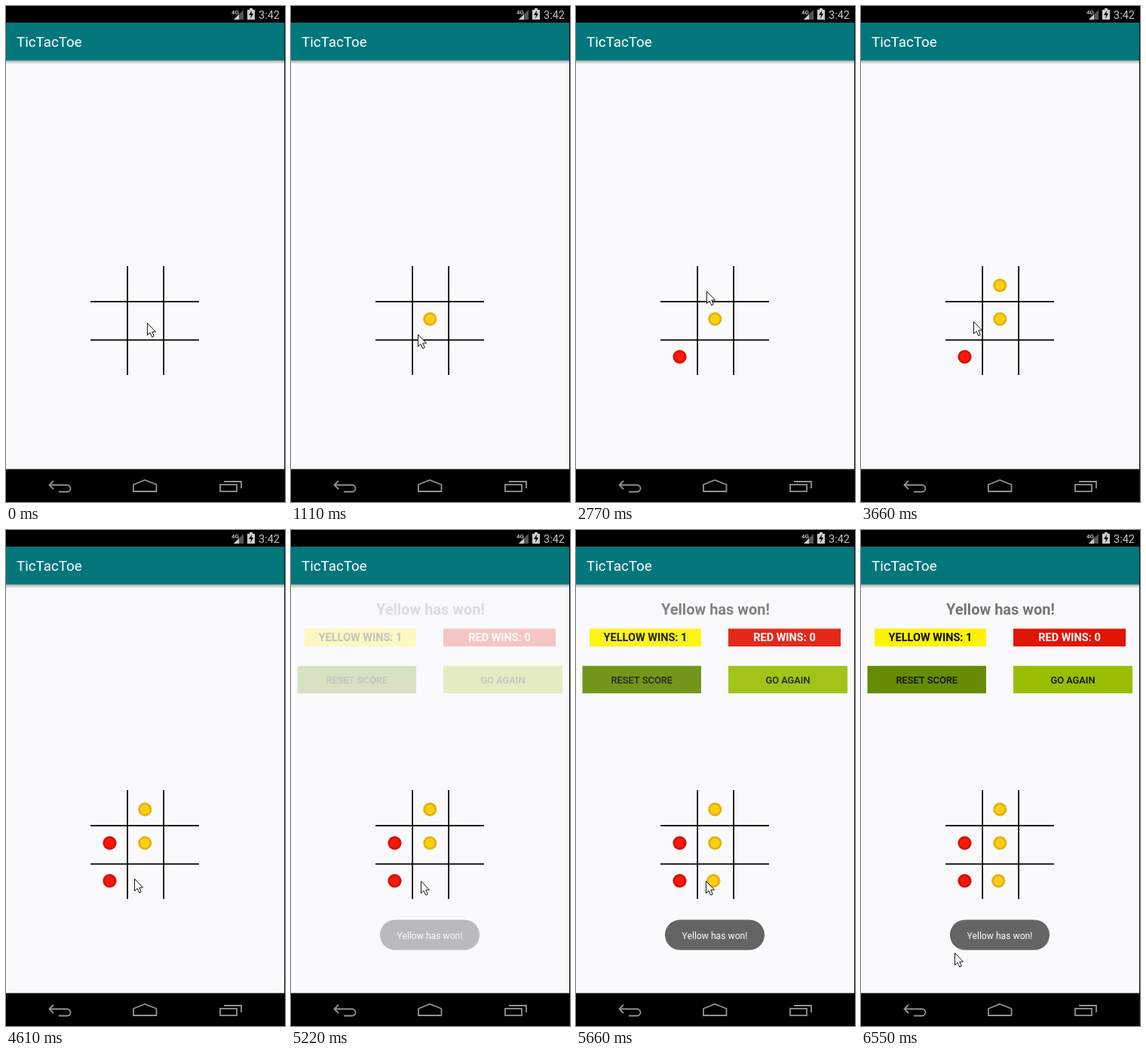
Recreate the animation shown at these times as an HTML page with a canvas. Size 370 px wide and 656 px high, loop 6.61 s.

```html
<!DOCTYPE html>
<html lang="en">
<head>
<meta charset="utf-8">
<title>TicTacToe</title>
<style>
html, body { margin: 0; width: 100%; height: 100%; overflow: hidden; background: #fafafc; }
canvas { display: block; width: 370px; height: 656px; }
</style>
</head>
<body>
<canvas id="stage" width="370" height="656"></canvas>
<script>
const ctx = document.getElementById('stage').getContext('2d');
const LOOP = 6610;
const BG = [250, 250, 252];
const BLACK = [12, 12, 6], WHITE = [255, 255, 255];
const GRID = { x: 112, y: 344, size: 144 };
const DROP = { height: 500, time: 300 };
const RESULT_AT = 5110;

const yellow = { face: '#ffd010', rim: '#dca408', notch: '#f8c828' };
const red = { face: '#fc1804', rim: '#c41004', notch: '#e8220f' };
const chips = [
  { x: 184.3, y: 414, look: yellow, land: 680 },
  { x: 137.5, y: 464, look: red, land: 2020 },
  { x: 184.3, y: 369.5, look: yellow, land: 3140 },
  { x: 137.5, y: 414, look: red, land: 4057 },
  { x: 182.3, y: 464, look: yellow, land: 5498 }
];

// The pointer rests between these moves.
const home = { x: 187, y: 419 };
const moves = [
  { from: 700, to: 1600, x: 144, y: 453 },
  { from: 2110, to: 2740, x: 173, y: 377 },
  { from: 3150, to: 3660, x: 149, y: 417 },
  { from: 4060, to: 4720, x: 172, y: 464 },
  { from: 6050, to: 6600, x: 123, y: 561 }
];

const clamp = v => Math.max(0, Math.min(1, v));
const ease = v => 0.5 - 0.5 * Math.cos(Math.PI * clamp(v));
const mix = (color, a) =>
  `rgb(${color.map((c, i) => Math.round(BG[i] + (c - BG[i]) * a)).join(',')})`;

function rect(x, y, w, h, fill) {
  ctx.fillStyle = fill;
  ctx.fillRect(x, y, w, h);
}

function poly(points, close) {
  ctx.beginPath();
  points.forEach(([x, y]) => ctx.lineTo(x, y));
  if (close) ctx.closePath();
}

function shape(points, fill) {
  poly(points, true);
  ctx.fillStyle = fill;
  ctx.fill();
}

function circle(x, y, r) {
  ctx.beginPath();
  ctx.arc(x, y, r, 0, 2 * Math.PI);
}

function text(str, x, y, font, fill, align = 'center') {
  ctx.font = `${font} Roboto, sans-serif`;
  ctx.textAlign = align;
  ctx.fillStyle = fill;
  ctx.fillText(str, x, y);
}

function drawStatusBar() {
  rect(0, 0, 370, 22, '#000');
  text('4G', 299, 11, '500 8px', '#d0d0d0', 'left');
  shape([[315, 5], [315, 18], [302, 18]], '#555');
  shape([[309, 11], [309, 18], [302, 18]], '#ccc');
  rect(323, 3, 4, 2, '#ccc');
  rect(320, 5, 10, 13, '#ccc');
  shape([[326, 6], [322, 12], [325, 12], [324, 17], [328, 10], [325.5, 10]], '#000');
  text('3:42', 335, 17, '14.5px', '#c4c4c4', 'left');
}

function drawAppBar() {
  rect(0, 22, 370, 50, '#02777b');
  const shade = ctx.createLinearGradient(0, 72, 0, 77);
  shade.addColorStop(0, 'rgba(60,70,72,.45)');
  shade.addColorStop(1, 'rgba(60,70,72,0)');
  rect(0, 72, 370, 5, shade);
  text('TicTacToe', 14, 54, '18.8px', '#fff', 'left');
}

function drawNavBar() {
  rect(0, 612.5, 370, 44, '#000');
  ctx.strokeStyle = '#929292';
  ctx.lineWidth = 1.8;
  poly([[63, 628], [57.5, 633.5], [63, 639]]);
  ctx.moveTo(57.5, 633.5);
  ctx.arc(81, 638, 4.5, -Math.PI / 2, Math.PI / 2);
  ctx.lineTo(70, 642.5);
  ctx.stroke();
  poly([[169, 642], [169, 633], [184, 627], [199.5, 633], [199.5, 642]], true);
  ctx.stroke();
  ctx.strokeRect(284, 633, 22, 9);
  poly([[289, 629], [312, 629], [312, 638]]);
  ctx.stroke();
}

function drawGrid() {
  const { x, y, size } = GRID, ink = '#080808', w = 1.8;
  for (const left of [160.2, 208.2]) rect(left, y, w, size, ink);
  for (const top of [390.1, 440.8]) rect(x, top, size, w, ink);
}

function drawChip(x, y, { face, rim, notch }) {
  circle(x, y, 9);
  ctx.fillStyle = rim;
  ctx.fill();
  const r = 8.2, dash = 2 * Math.PI * r / 28;
  ctx.strokeStyle = notch;
  ctx.lineWidth = 1.6;
  ctx.setLineDash([dash, dash]);
  circle(x, y, r);
  ctx.stroke();
  ctx.setLineDash([]);
  circle(x, y, 6.5);
  ctx.fillStyle = face;
  ctx.fill();
}

function drawChips(t) {
  ctx.save();
  ctx.beginPath();
  ctx.rect(GRID.x, GRID.y, GRID.size, GRID.size);
  ctx.clip();
  for (const { x, y, look, land } of chips) {
    const rest = 1 - ease((t - land) / DROP.time + 1);
    drawChip(x, y - rest * DROP.height, look);
  }
  ctx.restore();
}

function drawPanel(x, y, w, h, color, label, font, ink, a) {
  rect(x, y, w, h, mix(color, a));
  text(label, x + w / 2, Math.round(y + h / 2 + 5.2), font, mix(ink, a));
}

function drawToast(label, a) {
  ctx.beginPath();
  ctx.roundRect(118, 515.5, 132, 40, 20);
  ctx.fillStyle = mix([100, 100, 100], a);
  ctx.fill();
  // Fall back to a smaller size when there is no condensed face.
  ctx.font = 'condensed 14px Roboto, sans-serif';
  const size = 14 * Math.min(1, 87 / ctx.measureText(label).width);
  text(label, 184, 541, `condensed ${size}px`, mix(WHITE, a));
}

function drawResult(t) {
  if (t < RESULT_AT) return;
  const a = ease((t - 4935) / 900);
  const score = 'bold 14.5px', button = '500 12.8px', won = 'Yellow has won!';
  text(won, 185, 112, 'bold 20px', mix([118, 118, 116], a));
  drawPanel(18, 130.5, 148, 23.5, [255, 243, 0], 'YELLOW WINS: 1', score, BLACK, a);
  drawPanel(202, 130.5, 149, 23.5, [226, 20, 4], 'RED WINS: 0', score, WHITE, a);
  drawPanel(8.5, 179.7, 157.5, 36.3, [102, 140, 4], 'RESET SCORE', button, BLACK, a);
  drawPanel(202, 179.7, 158, 36.3, [153, 190, 4], 'GO AGAIN', button, BLACK, a);
  drawToast(won, clamp((t - 4920) / 710));
}

function pointerAt(t) {
  let { x, y } = home;
  for (const m of moves) {
    const k = ease((t - m.from) / (m.to - m.from));
    x += (m.x - x) * k;
    y += (m.y - y) * k;
  }
  return [x, y];
}

function drawPointer(t) {
  const [x, y] = pointerAt(t);
  ctx.save();
  ctx.translate(Math.round(x) + 0.5, Math.round(y) + 0.5);
  shape([[0, 0], [0, 16], [3.6, 12.6], [6.2, 18.4], [8.8, 17.2], [6.3, 11.6], [11, 11.4]], '#fff');
  ctx.strokeStyle = '#111';
  ctx.lineWidth = 1;
  ctx.stroke();
  ctx.restore();
}

function draw(t) {
  rect(0, 0, 370, 656, mix(BG, 1));
  drawStatusBar();
  drawAppBar();
  drawNavBar();
  rect(369, 22, 1, 634, '#111');
  drawGrid();
  drawChips(t);
  drawResult(t);
  drawPointer(t);
}

const start = performance.now();
function tick() {
  draw((performance.now() - start) % LOOP);
  requestAnimationFrame(tick);
}
tick();
</script>
</body>
</html>
```
